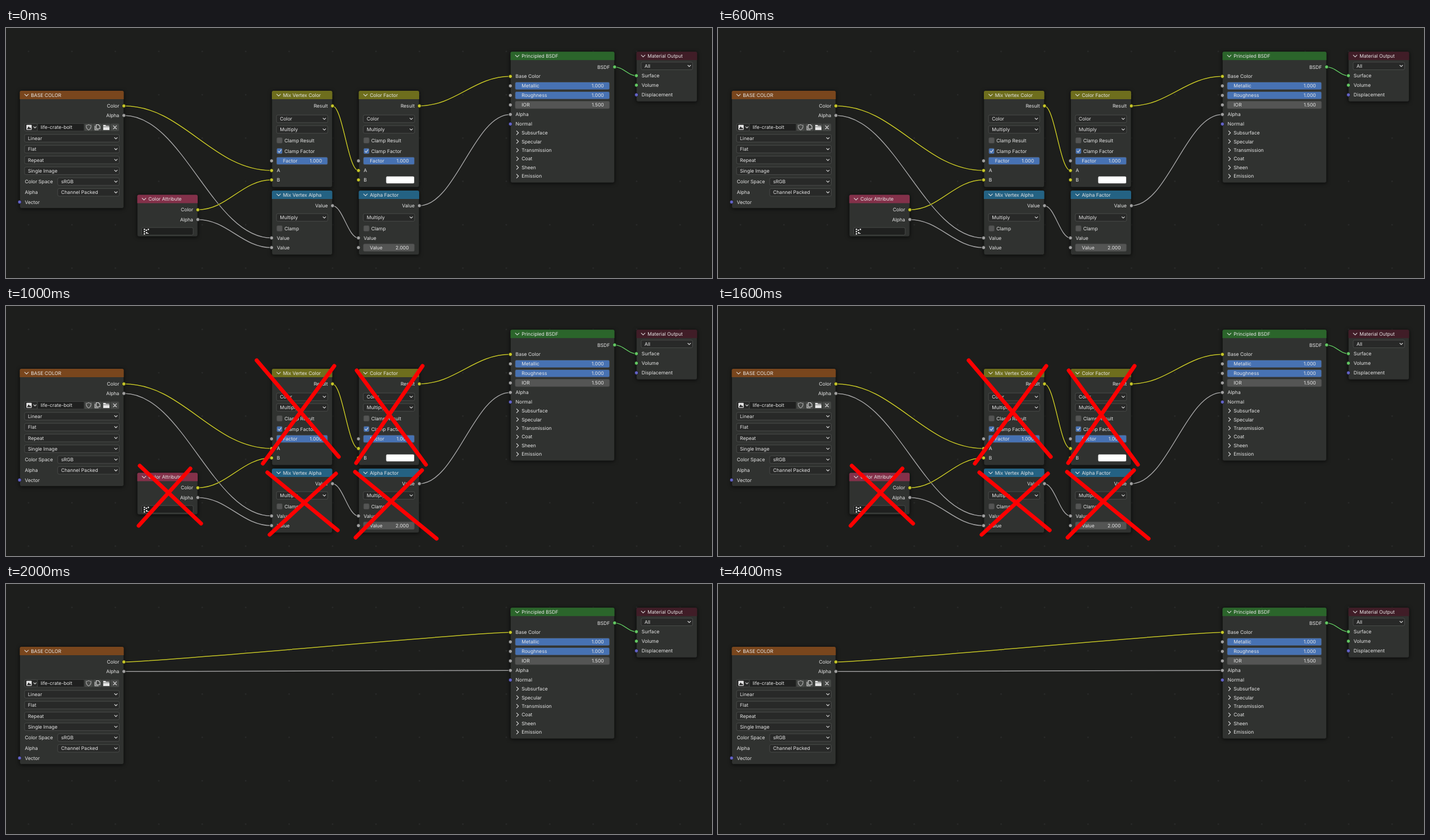
An HTML page that plays this animation: 1256 by 446 pixels, repeating every 6 s.

```html
<!DOCTYPE html>
<html lang="en">
<head>
<meta charset="utf-8">
<title>Node graph cleanup</title>
<style>
html, body { margin: 0; width: 100%; height: 100%; overflow: hidden; background: #1d1e1c; }
svg { display: block; }
text { font: 8.6px Inter, "Noto Sans", sans-serif; fill: #e6e6e6; white-space: pre; text-rendering: geometricPrecision; }
.node { filter: drop-shadow(0 1px 3px #000a); }
.line { fill: none; stroke: #dcdcdc; stroke-width: 1.1; stroke-linecap: round; stroke-linejoin: round; }
.cross { fill: none; stroke: #fe0000; stroke-width: 7; stroke-linecap: round; }
</style>
</head>
<body>
<svg id="stage" width="1256" height="446" viewBox="0 0 1256 446"></svg>
<script>
const YELLOW = '#c7c729', GRAY = '#a1a1a1', GREEN = '#63c763', VIOLET = '#6363c7';
const BLUE = '#4772b3', FIELD = '#282928', MID = '#545554';

const rect = (x, y, w, h, fill, r = 2, stroke = 'none') =>
  `<rect x="${x}" y="${y}" width="${w}" height="${h}" rx="${r}" fill="${fill}" stroke="${stroke}" stroke-width=".8"/>`;
const text = (x, y, s, anchor = 'start') =>
  `<text x="${x}" y="${y + 3.1}" text-anchor="${anchor}">${s}</text>`;
const line = d => `<path class="line" d="${d}"/>`;
const down = (x, y, w = 3.3) => line(`M${x - w} ${y - w / 2}l${w} ${w}l${w} ${-w}`);
const socket = (x, y, color) =>
  `<circle cx="${x}" cy="${y}" r="3.2" fill="${color}" stroke="#151615" stroke-width=".8"/>`;

// Nodes: body with coloured header, then rows placed by their centre line
const node = (x, y, w, h, color, title, rows) =>
  `<g class="node">${rect(x, y, w, h, '#303230', 3, '#161716')}
   <path d="M${x} ${y + 15}v-12q0-3 3-3h${w - 6}q3 0 3 3v12z" fill="${color}"/></g>` +
  down(x + 12, y + 7.7) + text(x + 19.7, y + 7.7, title) + rows.join('');
const output = (x, y, label, color) => text(x - 8.3, y, label, 'end') + socket(x, y, color);
const input = (x, y, label, color) => text(x + 9.2, y, label) + socket(x, y, color);
const menu = (x, y, w, label) =>
  rect(x, y - 6.8, w, 13.6, FIELD, 2.5, '#505250') + text(x + 6, y, label) + down(x + w - 6, y, 2.4);
const slider = (x, y, w, label, value, fill = BLUE) =>
  rect(x, y - 6.7, w, 13.4, fill, 2.5, '#434543') +
  text(x + 11.5, y, label) + text(x + w - 10, y, value, 'end');
const check = (x, y, label, on) =>
  rect(x, y - 5, 10, 10, on ? BLUE : MID, 2, '#434543') +
  (on ? line(`M${x + 2.4} ${y}l2 2.3l3.5 -4.6`) : '') + text(x + 13.5, y, label);
const panel = (x, y, label) => line(`M${x - 1.6} ${y - 3.3}l3.3 3.3l-3.3 3.3`) + text(x + 7.2, y, label);

const link = (x0, y0, x1, y1, color) => {
  const dx = x1 - x0, slope = Math.abs((y1 - y0) / dx);
  const bend = 0.4 * dx * Math.min(1, slope * 3.5);
  const d = `M${x0} ${y0}C${x0 + bend} ${y0} ${x1 - bend} ${y1} ${x1} ${y1}`;
  return `<path d="${d}" fill="none" stroke="#151615" stroke-width="2.8"/>
    <path d="${d}" fill="none" stroke="${color}" stroke-width="1.5"/>`;
};

function grid() {
  let s = '';
  for (let i = 0; i < 16; i++)
    for (let j = 0; j < 6; j++)
      s += `<circle cx="${40 + i * 77.28}" cy="${41.7 + j * 77.3}" r="1.5" fill="#292a29"/>`;
  return s;
}

const imageRow = () =>
  rect(33, 170.5, 23, 13.4, FIELD, 2.5, '#505250') +
  rect(56, 170.5, 83, 13.4, '#1f201f', 0, '#434543') +
  [139.5, 155, 170.5, 186].map(x => rect(x, 170.5, 15.2, 13.4, '#464846', 1.5, '#383a38')).join('') +
  rect(36.3, 172.7, 9.4, 9, '#e6e6e6', 1) +
  '<path d="M37.3 180.5l3-5l2.2 3l1-1l1.5 3z" fill="#282928"/>' +
  down(51.5, 177.3, 2.2) + text(61.7, 177.2, 'life-crate-bolt') +
  '<g opacity=".65">' + line('M147 172.4q2 1.5 4.2 1.3q.4 6-4.2 8.2q-4.6-2.2-4.2-8.2q2.2.2 4.2-1.3z') + '</g>' +
  line('M160.5 172.5h4l2.6 2.6v4.6h-6.6zM158.3 174.8v7h6') +
  '<path d="M173 173h4l1 1.5h5.5v1.3h-10.5zM173 176.6h11v5.4h-11z" fill="#e6e6e6"/>' +
  line('M191 174.4l5.6 5.6m0-5.6l-5.6 5.6');

const baseNode = node(24.5, 112, 185, 209.5, '#79461d', 'BASE COLOR', [
  output(209.7, 139, 'Color', YELLOW), output(209.7, 156, 'Alpha', GRAY), imageRow(),
  ...['Linear', 'Flat', 'Repeat', 'Single Image'].map((s, i) => menu(33, 196.7 + i * 19.35, 168.5, s)),
  text(33.5, 274, 'Color Space'), menu(92, 274, 109.5, 'sRGB'),
  text(33.5, 293.2, 'Alpha'), menu(92, 293.2, 109.5, 'Channel Packed'),
  input(24.2, 310.4, 'Vector', VIOLET)]);

const shaderNode = node(897.5, 42.3, 185, 233.7, '#2b652b', 'Principled BSDF', [
  output(1082.7, 69.4, 'BSDF', GREEN), input(897.4, 86.3, 'Base Color', YELLOW),
  ...[['Metallic', '1.000', BLUE], ['Roughness', '1.000', BLUE], ['IOR', '1.500', MID]].map(([s, v, c], i) =>
    socket(897.4, 103.2 + i * 17, GRAY) + slider(905.8, 103.2 + i * 17, 168, s, v, c)),
  input(897.4, 154.2, 'Alpha', GRAY), input(897.4, 171.3, 'Normal', VIOLET),
  ...['Subsurface', 'Specular', 'Transmission', 'Coat', 'Sheen', 'Emission'].map((s, i) =>
    panel(910, 187 + i * 15.45, s))]);

const outputNode = node(1121.5, 42.3, 108, 89, '#401d27', 'Material Output', [
  menu(1130, 67.7, 91.5, 'All'), input(1121.6, 85, 'Surface', GREEN),
  input(1121.6, 102, 'Volume', GREEN), input(1121.6, 119.2, 'Displacement', VIOLET)]);

const attributeNode = node(233.5, 297.6, 107.5, 74.4, '#83314a', 'Color Attribute', [
  output(341.2, 324.3, 'Color', YELLOW), output(341.2, 341.7, 'Alpha', GRAY),
  rect(241.5, 356, 91.5, 13.4, '#1f201f', 2.5, '#505250'),
  ...[[245, 358], [245, 362], [245, 366], [248.5, 359.5], [252, 358], [249, 364]].map(([x, y]) =>
    rect(x, y, 2.4, 2.4, '#e6e6e6', .5)),
  line('M250 366.5h3.5')]);

const colorNode = (x, title, last) => node(x, 112, 107.5, 172, '#6e6e1d', title, [
  output(x + 107.8, 139, 'Result', YELLOW),
  menu(x + 8.2, 162, 91.2, 'Color'), menu(x + 8.2, 181, 91.2, 'Multiply'),
  check(x + 8.7, 200.6, 'Clamp Result', false), check(x + 8.7, 219.5, 'Clamp Factor', true),
  socket(x - .4, 237, GRAY), slider(x + 8.2, 237, 91, 'Factor', '1.000'),
  input(x - .4, 254.2, 'A', YELLOW), input(x - .4, 271, 'B', YELLOW), last]);

const alphaNode = (x, title, last) => node(x, 290, 107.5, 114.5, '#246283', title, [
  output(x + 107.8, 317, 'Value', GRAY), menu(x + 8.2, 338, 91.2, 'Multiply'),
  check(x + 8.7, 357.6, 'Clamp', false), input(x - .4, 374.5, 'Value', GRAY),
  socket(x - .4, 391.8, GRAY), last]);

const mixLinks = [
  [210, 139, 472.5, 254.2, YELLOW], [210, 156, 472.5, 374.5, GRAY],
  [341, 324.3, 472.5, 271, YELLOW], [341, 341.7, 472.5, 391.8, GRAY],
  [580.5, 139, 627, 254.2, YELLOW], [580.5, 317, 627, 374.5, GRAY],
  [735, 139, 897.4, 86.3, YELLOW], [735, 317, 897.4, 154.2, GRAY]];
const directLinks = [[210, 139, 897.4, 86.3, YELLOW], [210, 156, 897.4, 154.2, GRAY]];
const drawLinks = list => list.map(l => link(...l)).join('');

const crosses = [
  'M446 97L592 269M584 107L457 281', 'M624 115L747 283M741 107L623 280',
  'M238 285L347 388M328 290L236 392', 'M465 297L590 400M587 299L469 408',
  'M621 296L766 415M740 293L622 413'].join('');

document.getElementById('stage').innerHTML = `
  ${rect(0, 0, 1256, 446, '#1d1e1c', 0)}${grid()}
  <g id="mixing">${drawLinks(mixLinks)}${attributeNode}
    ${colorNode(473, 'Mix Vertex Color', '')}
    ${colorNode(627.5, 'Color Factor', rect(676, 264.4, 50.5, 13.2, '#fff', 2.5, '#434543'))}
    ${alphaNode(473, 'Mix Vertex Alpha', text(482, 391.8, 'Value'))}
    ${alphaNode(627.5, 'Alpha Factor', slider(635.7, 391.8, 91, 'Value', '2.000', MID))}
  </g>
  <g id="direct">${drawLinks(directLinks)}</g>
  ${link(1082.7, 69.4, 1121.6, 85, GREEN)}
  ${baseNode}${shaderNode}${outputNode}
  <path id="crosses" class="cross" d="${crosses}"/>`;

const show = (id, on) => document.getElementById(id).setAttribute('visibility', on ? 'visible' : 'hidden');
function tick() {
  const t = performance.now() % 6000;
  show('mixing', t < 2000);
  show('crosses', t >= 1000 && t < 2000);
  show('direct', t >= 2000);
  requestAnimationFrame(tick);
}
tick();
</script>
</body>
</html>
```
